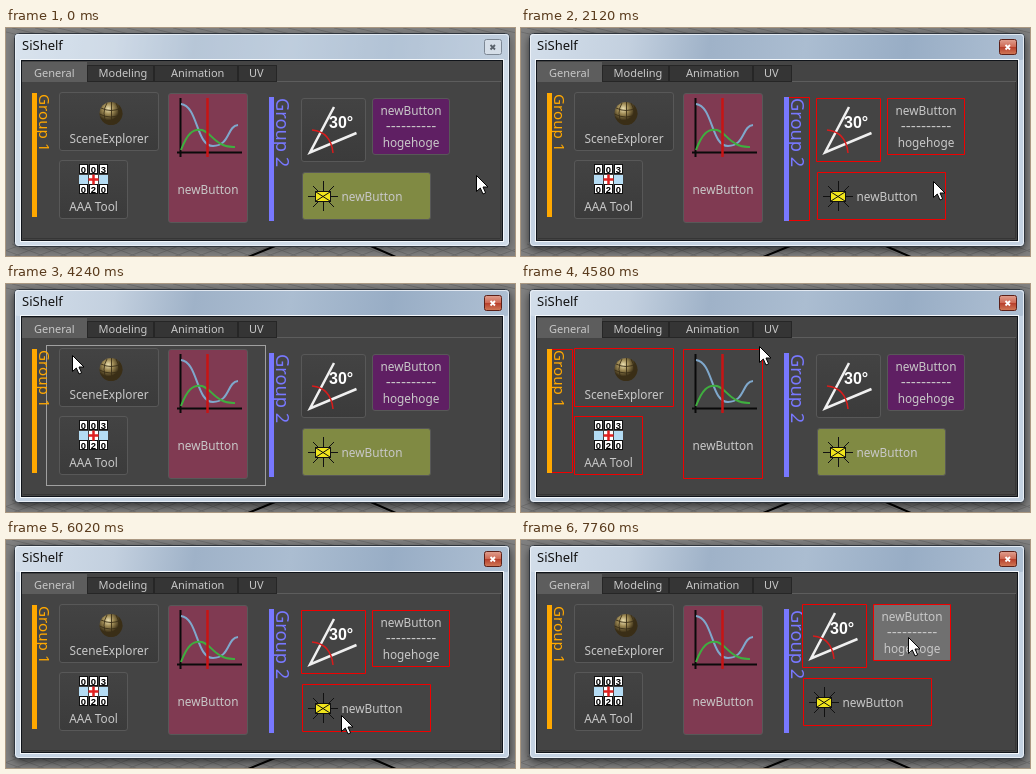
An HTML page for the animation above (8 s loop, 509x228 px).

```html
<!DOCTYPE html>
<html lang="en">
<head>
<meta charset="utf-8">
<title>Shelf window</title>
<style>
html, body { margin: 0; width: 100%; height: 100%; overflow: hidden; background: #808080; }
svg { display: block; width: 509px; height: 228px; font-family: "Noto Sans", "Open Sans", sans-serif; font-size: 11.8px; }
.label { fill: #c8c8c8; text-anchor: middle; }
.tab { fill: #c8c8c8; font-size: 11px; }
.dash { font-family: "DejaVu Sans", sans-serif; font-size: 14px; }
.bold { font-family: "Liberation Sans", sans-serif; font-weight: 700; }
.line { fill: none; stroke-width: 2; }
</style>
</head>
<body>
<svg id="stage" viewBox="0 0 509 228" xmlns="http://www.w3.org/2000/svg">
  <defs>
    <linearGradient id="glass" gradientUnits="userSpaceOnUse" x1="8" y1="6" x2="503" y2="80">
      <stop offset="0" stop-color="#d3deea"/><stop offset=".2" stop-color="#c3d0df"/>
      <stop offset=".36" stop-color="#9fb2c8"/><stop offset=".55" stop-color="#abbdd1"/>
      <stop offset=".75" stop-color="#98adc5"/><stop offset="1" stop-color="#b0c1d4"/>
    </linearGradient>
    <linearGradient id="red" x2="0" y2="1">
      <stop offset="0" stop-color="#e0a090"/><stop offset=".48" stop-color="#cf6a55"/>
      <stop offset=".52" stop-color="#b8402c"/><stop offset="1" stop-color="#d07a58"/>
    </linearGradient>
    <linearGradient id="face" x2="0" y2="1">
      <stop offset="0" stop-color="#434343"/><stop offset="1" stop-color="#3b3b3b"/>
    </linearGradient>
    <radialGradient id="ball" cx=".38" cy=".3">
      <stop offset="0" stop-color="#efe3b4"/><stop offset=".45" stop-color="#a08c56"/><stop offset="1" stop-color="#3a2e16"/>
    </radialGradient>
    <filter id="blur" x="-10%" y="-10%" width="120%" height="120%"><feGaussianBlur stdDeviation="4"/></filter>
  </defs>

  <rect width="509" height="228" fill="#808080"/>
  <path id="grid" stroke="#6e6e6e" fill="none"/>
  <path d="M242 229L274 216M360 216L390 229" stroke="#000" stroke-width="2"/>
  <rect id="shadow" x="8" y="8" width="496" height="214" rx="6" filter="url(#blur)"/>

  <rect x="8.500" y="5.500" width="495" height="213" rx="4" fill="#c4d2e2" stroke="#30363e"/>
  <rect x="9" y="6" width="494" height="26" rx="3" fill="url(#glass)"/>
  <rect x="9.500" y="6.500" width="493" height="211" rx="3" fill="none" stroke="#f2f6fa" stroke-opacity=".8"/>
  <rect id="pale" x="9" y="6" width="494" height="212" rx="4" fill="#e3eaf2"/>
  <text x="16" y="22" font-size="13" fill="#111">SiShelf</text>
  <rect id="close" x="478.500" y="11.500" width="17" height="15" rx="2"/>
  <path id="cross" d="M484.500 17l4.500 4.500m0-4.500l-4.500 4.500" stroke-width="1.800"/>

  <rect x="14.500" y="31.500" width="483" height="182" fill="none" stroke="#f2f6fa"/>
  <rect x="15.500" y="32.500" width="481" height="180" fill="#444" stroke="#10141a"/>
  <rect x="17" y="53" width="478" height="1" fill="#5d5d5d"/>
  <path d="M17 210.500H494.500V54" fill="none" stroke="#363636"/>
  <g id="tabs"></g>

  <rect id="band" fill="none" stroke="#a0a0a0"/>
  <g id="items"></g>

  <circle id="press" r="9.500" fill="none" stroke="#f4f4f4" stroke-width="1.300"/>
  <g id="cursor">
    <path d="M.5 .5V16.500L4.300 13L7 19L9.600 17.800L7 12H12Z" fill="#fff" stroke="#000"/>
    <rect id="dragBox" x="4.500" y="12.500" width="10" height="8" fill="#444" stroke="#ddd" stroke-dasharray="1.500 1.500"/>
  </g>
</svg>
<script>
const $ = id => document.getElementById(id);
const LOOP = 8000;

const label = (x, y, s, cls = '') => `<text class="label ${cls}" x="${x}" y="${y}">${s}</text>`;
const sideText = (x, y, s, size, color) =>
  `<text transform="translate(${x} ${y}) rotate(90)" font-size="${size}" fill="${color}">${s}</text>`;
const box = (x, y, w, h) => `M${x} ${y}h${w}v${h}h${-w}z`;

const sphere = `<circle cx="105" cy="85.500" r="11.500" fill="url(#ball)"/>
  <path d="M95 80q10 5 20 0M93.500 86q11 6 23 0M96 92q9 5 18 0M101 75q-6 10 0 21M105.500 74v23M110 75q6 10 0 21"
    fill="none" stroke="#3a2f18" stroke-width=".9"/>`;

const digits = (y, s) => [...s].map((c, i) =>
  `<rect x="${73.500 + i * 10}" y="${y}" width="8" height="9" fill="#fff" stroke="#111"/>
   <text class="bold" x="${77.500 + i * 10}" y="${y + 8}" font-size="9.500" text-anchor="middle" fill="#000">${c}</text>`).join('');
const counter = digits(136.500, '003') +
  `<path d="M73 147h9v9h-9zM93 147h9v9h-9z" fill="#b4dcf4"/><rect x="83" y="147" width="9" height="9" fill="#fff"/>` +
  digits(156.500, '020') + `<path d="M82.500 151.500h10M87.500 146.500v10" stroke="#e02020" stroke-width="2.500"/>`;

const curves = `<g class="line"><path d="M174.500 70V129M171 124.500H236" stroke="#0a0a0a"/>
  <path d="M175 76C192 78 190 118 207 118S221 98 232 97" stroke="#7fa8cc"/>
  <path d="M175 122C181 106 187 100 196 102S210 120 229 119" stroke="#3fae3f"/>
  <path d="M201.500 70V129" stroke="#c81414" stroke-width="2.500"/></g>`;

const angle = `<g class="line"><path d="M328 79L304 124.500L350.500 105" stroke="#f0f0f0" stroke-width="2.500"/>
  <path d="M306 102Q325 104 327 125" stroke="#d81c1c" stroke-width="1.500"/></g>
  <text class="bold" x="323" y="100" font-size="16" fill="#fff">30°</text>`;

const lamp = `<path d="M317.500 153v30M302 168.500h30M307 158l21 21m0-21l-21 21" stroke="#111"/>
  <rect x="309.500" y="163.500" width="15" height="10" fill="#f2e61c" stroke="#111"/>
  <path d="M310 164l14 9m0-9l-14 9" stroke="#111"/>`;

const items = [
  { group: 1, art: sideText(33, 66, 'Group 1', 15.2, '#ffa800'), red: box(30.5, 65.5, 21, 123),
    bar: [26, 65, '#ffa800'] },
  { group: 1, rect: [53.5, 64.5, 99, 58], art: sphere + label(103, 115, 'SceneExplorer') },
  { group: 1, rect: [53.5, 132.5, 68, 58], art: counter + label(87.5, 183, 'AAA Tool') },
  { group: 1, rect: [162.5, 65.5, 79, 129], fill: '#803a52', art: curves + label(202, 166, 'newButton') },
  { group: 2, art: sideText(270, 70, 'Group 2', 18.3, '#7878ff'), red: box(267.5, 69.5, 21, 123),
    bar: [263, 69, '#7878ff'] },
  { group: 3, rect: [295.5, 70.5, 64, 63], art: angle },
  { group: 3, rect: [296.5, 144.5, 128, 47], fill: '#808a43', art: lamp + label(366, 173, 'newButton') },
  { group: 3, rect: [366.5, 70.5, 77, 56], fill: '#5f1f63', hover: true,
    art: label(405, 87, 'newButton') + label(405, 103, '----------', 'dash') + label(405, 119, 'hogehoge') }
];

function buildScene() {
  let d = '';
  for (let x = -40; x < 550; x += 23) d += `M${x} 229l34-13m0 13l-34-13M${x} 0l34 8`;
  $('grid').setAttribute('d', d);

  $('tabs').innerHTML = [['General', 16, 64, 28], ['Modeling', 81, 66, 92.5], ['Animation', 148, 83, 165], ['UV', 232, 38, 243]]
    .map(([name, x, w, tx], i) => `<rect x="${x + .5}" y="${i ? 37.5 : 34.5}" width="${w}" height="${i ? 16 : 19}"
      fill="${i ? '#353535' : '#5d5d5d'}" stroke="${i ? '#262626' : '#5d5d5d'}"/>
      <text class="tab" x="${tx}" y="49">${name}</text>`).join('');

  for (const it of items) {
    const g = document.createElementNS('http://www.w3.org/2000/svg', 'g');
    const [x, y, w, h] = it.rect || [];
    const bar = it.bar ? `<rect x="${it.bar[0]}" y="${it.bar[1]}" width="5" height="124" fill="${it.bar[2]}"/>` : '';
    const face = it.rect ? `<rect class="face" x="${x}" y="${y}" width="${w}" height="${h}" rx="2.500"/>` : '';
    g.innerHTML = `${face}${it.art}<path class="red" d="${it.red || box(x, y, w, h)}" fill="none" stroke="#f00000"/>${bar}`;
    it.node = g;
    it.face = g.querySelector('.face');
    it.outline = g.querySelector('.red');
    $('items').append(g);
  }
}

// time, x, y, and 1 for a segment that arrives at constant speed
const path = [
  [0, 470, 147], [190, 470, 147], [760, 470, 75], [870, 470, 75], [1430, 266, 179], [1640, 266, 179],
  [2400, 474, 142], [2510, 475, 142], [2740, 274, 184], [2800, 274, 184], [3210, 259, 202], [3300, 259, 200],
  [4050, 40, 59], [4120, 44, 57], [4240, 66, 71], [4310, 66, 71], [4900, 461, 50], [5020, 480, 58], [5080, 480, 58],
  [5360, 391, 156, 1], [5740, 326, 185, 1], [5860, 326, 185], [6560, 395, 102], [6640, 395, 102],
  [6700, 413, 112], [6740, 413, 112], [6990, 420, 110], [7480, 420, 110], [7760, 387, 97], [LOOP, 387, 97]
];
// start, end, anchor x, anchor y, time of the last resize
const bands = [[870, 1680, 470, 77, 1430], [3300, 4310, 259, 201, 4060], [5050, 5840, 479, 60, 5740]];
const presses = [[850, 1620], [2420, 2530], [3270, 4130], [5020, 5800], [6520, 6640]];
const drags = [[6660, 6960], [7270, 7740]];
const selected = { 1: [[4310, 5850]], 2: [[1680, 2460]], 3: [[1680, 2460], [5850, LOOP]] };
const hovers = [[6450, 6650], [6960, 7480], [7740, LOOP]];

const within = (t, spans) => spans.find(([a, b]) => t >= a && t < b);
const show = (node, on) => node.setAttribute('visibility', on ? 'visible' : 'hidden');
const attrs = (node, values) => { for (const k in values) node.setAttribute(k, values[k]); };

function cursorAt(t) {
  const i = Math.max(1, path.findIndex(k => k[0] > t));
  const [t0, x0, y0] = path[i - 1], [t1, x1, y1, steady] = path[i];
  let u = (t - t0) / (t1 - t0);
  if (!steady) u = (1 - Math.cos(Math.PI * u)) / 2;
  return [x0 + (x1 - x0) * u, y0 + (y1 - y0) * u].map(Math.round);
}

function render(t) {
  const active = t >= 190;
  attrs($('shadow'), { opacity: active ? .6 : .3 });
  attrs($('pale'), { opacity: active ? 0 : .35 });
  attrs($('close'), { fill: active ? 'url(#red)' : '#d5dee8', stroke: active ? '#5c2018' : '#7c8794' });
  attrs($('cross'), { stroke: active ? '#fff' : '#5a626c' });

  const [x, y] = cursorAt(t);
  attrs($('cursor'), { transform: `translate(${x} ${y})` });
  show($('dragBox'), within(t, drags));
  attrs($('press'), { cx: x + .5, cy: y + 2 });
  show($('press'), within(t, presses));

  const band = within(t, bands);
  show($('band'), band);
  if (band) {
    // The band trails the pointer slightly
    const [start, , bx, by, stop] = band;
    const [cx, tip] = cursorAt(Math.max(start, Math.min(t, stop) - 16));
    const cy = tip + 2;
    attrs($('band'), {
      x: Math.min(bx, cx) + .5, y: Math.min(by, cy) + .5,
      width: Math.abs(bx - cx), height: Math.abs(by - cy)
    });
  }

  const shift = t < 6960 ? [0, 0] : t < 7740 ? [25, 8] : [-14, -6];
  for (const it of items) {
    const on = within(t, selected[it.group]);
    show(it.outline, on);
    if (it.face) {
      const lit = it.hover && on && within(t, hovers);
      attrs(it.face, {
        fill: lit ? '#707070' : on ? '#444' : it.fill || 'url(#face)',
        stroke: on ? 'none' : '#585858'
      });
    }
    if (it.group === 3) attrs(it.node, { transform: `translate(${shift})` });
  }
}

buildScene();
const began = performance.now();
function frame() {
  render((performance.now() - began) % LOOP);
  requestAnimationFrame(frame);
}
frame();
</script>
</body>
</html>
```
